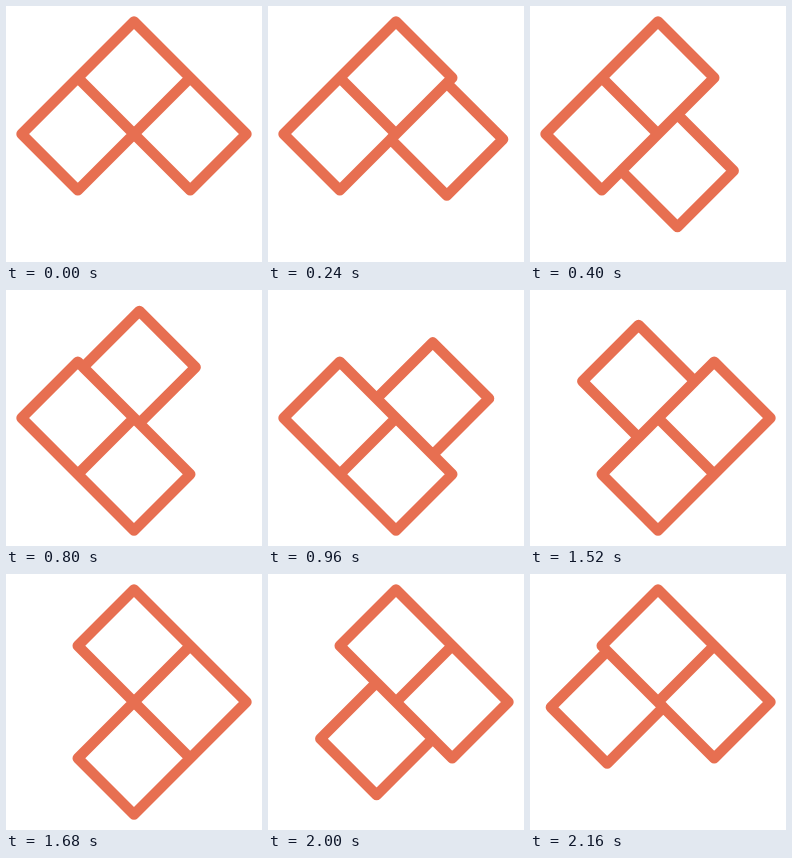
An HTML page that plays this animation: 256 px wide and 256 px high, repeating every 2.24 s.

```html
<!DOCTYPE html>
<html lang="en">
<head>
<meta charset="utf-8">
<title>Sliding diamonds</title>
<style>
html, body { margin: 0; width: 100%; height: 100%; overflow: hidden; background: #fff; }
svg { display: block; width: 100%; height: 100%; }
path { fill: none; stroke: #e76f51; stroke-width: 10.6; stroke-linejoin: round; }
</style>
</head>
<body>
<svg viewBox="0 0 256 256"><path id="diamonds"/></svg>
<script>
const STEP = 80, STEPS = 28, PER_MOVE = 7;
const HALF = 56.2;
const path = document.getElementById('diamonds');

// Slots run clockwise: top, right, bottom, left.
const slot = i => {
  const a = (i - 1) * Math.PI / 2;
  return [128 + HALF * Math.cos(a), 128 + HALF * Math.sin(a)];
};

const diamond = ([x, y]) =>
  `M${x} ${y - HALF}l${HALF} ${HALF} ${-HALF} ${HALF} ${-HALF} ${-HALF}z`;

function draw(time) {
  const step = Math.floor(time / STEP) % STEPS;
  const empty = 6 - Math.floor(step / PER_MOVE);
  // Rest for two steps, then glide for five with a sine ease.
  const t = Math.max(0, (step % PER_MOVE - 2) / 5);
  const ease = (1 - Math.cos(Math.PI * t)) / 2;
  const from = slot(empty - 1), to = slot(empty);
  const moving = from.map((v, i) => v + (to[i] - v) * ease);
  path.setAttribute('d', [moving, slot(empty + 1), slot(empty + 2)].map(diamond).join(''));
}

const start = performance.now();
function tick() {
  draw(performance.now() - start);
  requestAnimationFrame(tick);
}
tick();
</script>
</body>
</html>
```
